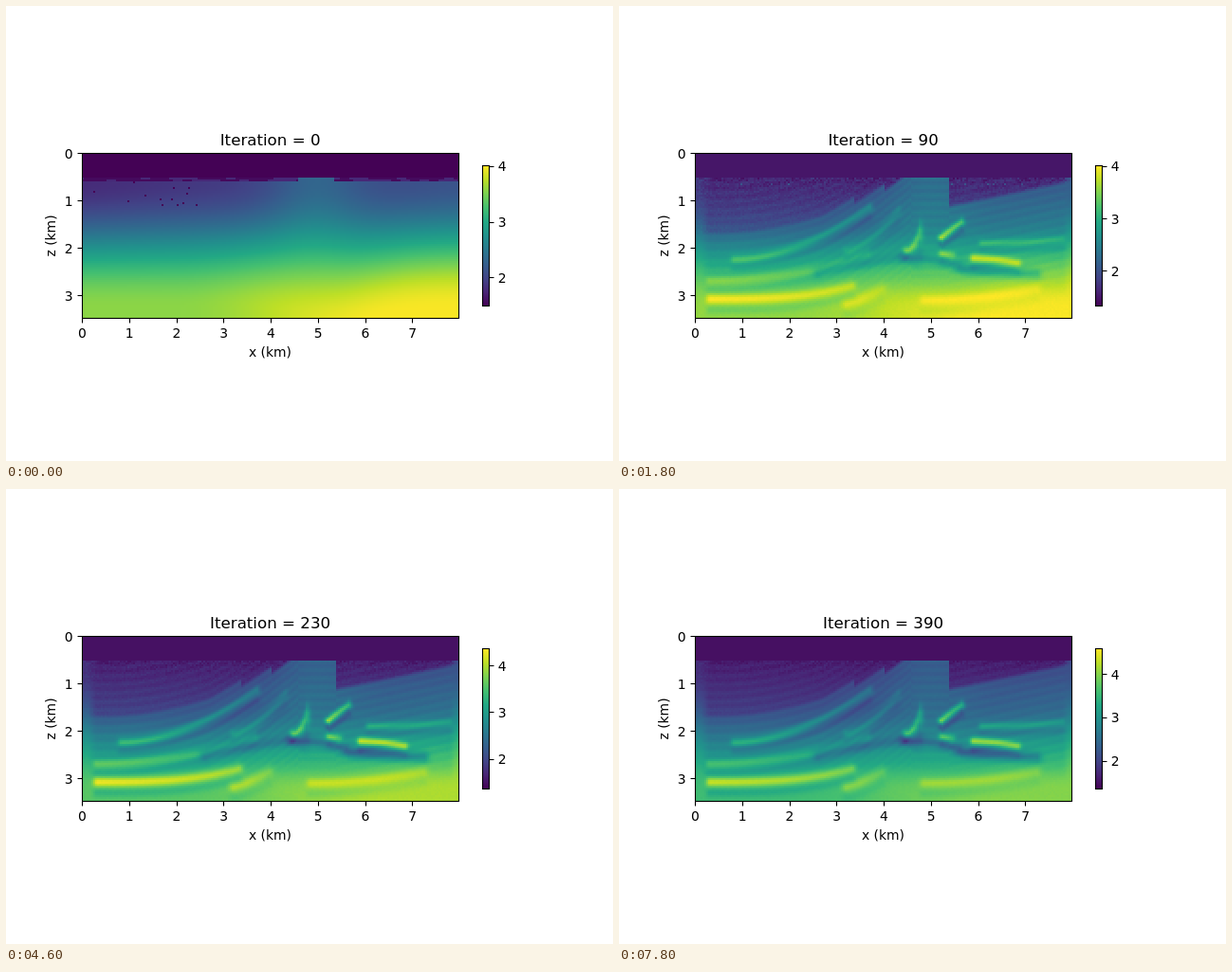
Animation, 640 px wide and 480 px high, one loop 8 s. Source, as an HTML page with a canvas:

```html
<!DOCTYPE html>
<html lang="en">
<head>
<meta charset="utf-8">
<title>Velocity model inversion</title>
<style>
html, body { margin: 0; width: 100%; height: 100%; overflow: hidden; background: #fff; }
#stage { position: relative; width: 640px; height: 480px; }
canvas { position: absolute; left: 80px; top: 155px; width: 398px; height: 174px; image-rendering: pixelated; }
svg { position: absolute; left: 0; top: 0; }
text { font: 13.89px "DejaVu Sans", sans-serif; }
#title { font-size: 16.67px; }
</style>
</head>
<body>
<div id="stage">
<canvas id="field" width="199" height="87"></canvas>
<svg id="plot" width="640" height="480" viewBox="0 0 640 480"></svg>
</div>
<script>
const W = 199, H = 87, SEABED = 13;
const STEP = 200, STEPS = 40, PER_STEP = 10;
const KM = 49.755, LEFT = 80, TOP = 155.33;
const VIRIDIS = ['440154', '482475', '414487', '355f8d', '2a788e', '21918c', '22a884', '44bf70', '7ad151', 'bddf26', 'fde725'];
const RGB = VIRIDIS.map(c => [0, 2, 4].map(i => parseInt(c.substr(i, 2), 16)));

const clamp = (v, a = 0, b = 1) => Math.min(b, Math.max(a, v));
const smooth = (a, b, v) => { const t = clamp((v - a) / (b - a)); return t * t * (3 - 2 * t); };
const bell = (v, mid, width) => Math.exp(-(((v - mid) / width) ** 2));
const hash = (a, b) => { const s = Math.sin(a * 127.1 + b * 311.7) * 43758.5453; return s - Math.floor(s); };

// Cell centres in stage pixels
const px = i => 81 + 2 * i, py = j => 156 + 2 * j;

// Smooth starting model in km/s: speed rises with depth, most on the right
function startModel(x, y) {
  const top = 1.8 + .35 * (x - 80) / 397 + .3 * bell(x, 325, 50);
  const deep = 3.58 + .42 * smooth(180, 400, x);
  return top + (deep - top) * smooth(186, 318 + 16 * bell(x, 350, 60), y);
}

// Base of the slow sediments: a rising flank with fault teeth, a block, a gentle slope
function sedimentFloor(x) {
  if (x > 348) return 212 - .21 * (x - 348);
  if (x > 308) return 0;
  const teeth = x > 215 ? 8 * ((x - 215) / 33 % 1) : 0;
  return 240 - 60 * clamp((x - 110) / 200) ** 1.8 - teeth;
}

const base = new Float32Array(W * H), delta = new Float32Array(W * H);

function eachCell(fn) {
  for (let j = 0; j < H; j++) for (let i = 0; i < W; i++) fn(px(i), py(j), j * W + i, i, j);
}

// A bed along y = y0 + (y1 - y0) t^bend; fast beds have a slow band beneath
function bed(amp, x0, y0, x1, y1, bend) {
  const width = (2.4 + Math.max(0, y0 - 230) / 60) * (amp < 0 ? 1.3 : 1);
  eachCell((x, y, n, i, j) => {
    if (j < SEABED) return;
    const t = clamp((x - x0) / (x1 - x0)), h = (y1 - y0) * t ** bend;
    const slope = t > 0 ? h * bend / (t * (x1 - x0)) : 0;
    const off = (y - y0 - h) / Math.hypot(1, slope);
    const past = Math.max(x0 - x, x - x1, 0) / width;
    const end = Math.exp(-past * past / 2) * (1 - .3 * t);
    const g = d => Math.exp(-d * d / (2 * width * width));
    delta[n] += amp * end * (g(off) - (amp > 0 ? .35 * g(off - 3 * width) : 0));
  });
}

function buildModel() {
  eachCell((x, y, n) => {
    const floor = sedimentFloor(x), inside = 1 - smooth(floor - 5, floor + 4, y);
    base[n] = startModel(x, y);
    const slow = 1.6 + (y - 181) * .0065 - base[n];
    const rock = -.25 * smooth(205, 245, y) * (1 - smooth(285, 315, y));
    const ripple = .045 * Math.sin((y - floor) * .7) * (1 - smooth(270, 310, y));
    delta[n] = slow * inside + rock * (1 - inside) + ripple;
  });
  // left flank
  bed(.65, 122, 267, 264, 213, 1.8);
  bed(.5, 95, 290, 262, 262, 2);
  bed(.8, 96, 309, 245, 295, 3);
  // crest
  bed(.35, 240, 258, 294, 217, 1.6);
  bed(-.45, 210, 281, 300, 265, .7);
  bed(-.5, 300, 265, 352, 273, 2);
  bed(.4, 240, 314, 277, 298, 1.3);
  bed(1, 303, 258, 317, 240, 2);
  bed(1.3, 340, 244, 361, 228, 1);
  bed(.9, 341, 261, 351, 263, 1);
  // right flank
  bed(1.2, 374, 266, 420, 271, 2);
  bed(.55, 383, 250, 468, 246, 2);
  bed(-.8, 360, 276, 440, 283, .5);
  bed(.35, 322, 310, 440, 298, 2);
}

const limits = it => [
  1.36 + .14 * Math.exp(-it / 12) - .12 * bell(it, 50, 30),
  4.02 + .0143 * Math.max(0, it - 90) ** .65
];

// Speckle of the sediments, strongest just below the seabed
function noise(x, y, i, j, it) {
  const r = hash(i, j) - .5;
  if (y > sedimentFloor(x)) return r * .03;
  const fade = .35 + .65 * Math.exp(-it / 110);
  const speck = j === 16 && hash(i, 5) > .95 ? .8 * Math.exp(-it / 110) : 0;
  return r * (.13 + .32 * Math.exp((181 - y) / 12)) * fade + speck;
}

// Patchy strip and stray points before the first update
function startDetail(x, y, i, j, v) {
  if (y < 186) {
    if (x > 308 && x < 347) return v;
    if (y < 182) return 1.75;
    return hash(Math.floor((i + j * 3) / 5), j) > .65 ? 1.78 : 1.56;
  }
  return x < 215 && y < 212 && hash(i, j) > .988 ? 1.5 : v;
}

const ctx = document.getElementById('field').getContext('2d');
const image = ctx.createImageData(W, H);

function paint(it, lo, hi) {
  eachCell((x, y, n, i, j) => {
    let v = 1.5;
    if (j >= SEABED) {
      const grow = 1 - Math.exp(-((it / (30 + 68 * smooth(185, 290, y))) ** 1.5));
      const edge = .15 + .85 * smooth(84, 97, x) * (1 - smooth(466, 477, x));
      v = base[n] + delta[n] * grow * edge;
      v = it ? v + noise(x, y, i, j, it) : startDetail(x, y, i, j, v);
    }
    const c = clamp((v - lo) / (hi - lo)) * 10, k = Math.min(9, Math.floor(c));
    for (let q = 0; q < 3; q++) image.data[n * 4 + q] = RGB[k][q] + (RGB[k + 1][q] - RGB[k][q]) * (c - k);
    image.data[n * 4 + 3] = 255;
  });
  ctx.putImageData(image, 0, 0);
}

const snap = v => Math.round(v) + .5;
const line = (x1, y1, x2, y2) => `<path d="M${x1} ${y1}L${x2} ${y2}" stroke="#000" stroke-width="1.1"/>`;
const label = (x, y, s, anchor, extra = '') => `<text x="${x}" y="${y}" text-anchor="${anchor}" ${extra}>${s}</text>`;
const box = (x, y, w, h, fill) => `<rect x="${x}" y="${y}" width="${w}" height="${h}" fill="${fill}" stroke="#000" stroke-width="1.1"/>`;

function buildAxes() {
  const stops = VIRIDIS.map((c, i) => `<stop offset="${i / 10}" stop-color="#${c}"/>`).join('');
  let s = `<defs><linearGradient id="ramp" x1="0" y1="1" x2="0" y2="0">${stops}</linearGradient></defs>`;
  s += box(80.5, 155.5, 397, 174, 'none') + box(502.5, 168.5, 7, 148, 'url(#ramp)');
  for (let k = 0; k < 8; k++) {
    const x = LEFT + KM * k;
    s += line(snap(x), 330, snap(x), 334.5) + label(x + .3, 350, k, 'middle');
  }
  for (let k = 0; k < 4; k++) {
    const y = snap(TOP + KM * k);
    s += line(75.5, y, 80, y) + label(70.5, y + 5.2, k, 'end');
  }
  s += label(278.5, 370, 'x (km)', 'middle');
  s += label(0, 0, 'z (km)', 'middle', 'transform="translate(52 242.5) rotate(-90)"');
  s += label(278.6, 147, '', 'middle', 'id="title"') + '<g id="scale"></g>';
  document.getElementById('plot').innerHTML = s;
}

function show(it) {
  const [lo, hi] = limits(it);
  paint(it, lo, hi);
  document.getElementById('title').textContent = 'Iteration = ' + it;
  document.getElementById('scale').innerHTML = [2, 3, 4].map(v => {
    const y = 316.5 - 148.3 * (v - lo) / (hi - lo);
    return line(510, snap(y - .5), 514.5, snap(y - .5)) + label(518.7, y + 5, v, 'start');
  }).join('');
}

let shown = -1;
function draw() {
  const step = Math.floor((performance.now() - begin) / STEP) % STEPS;
  if (step !== shown) show((shown = step) * PER_STEP);
  requestAnimationFrame(draw);
}

buildModel();
buildAxes();
const begin = performance.now();
draw();
</script>
</body>
</html>
```
